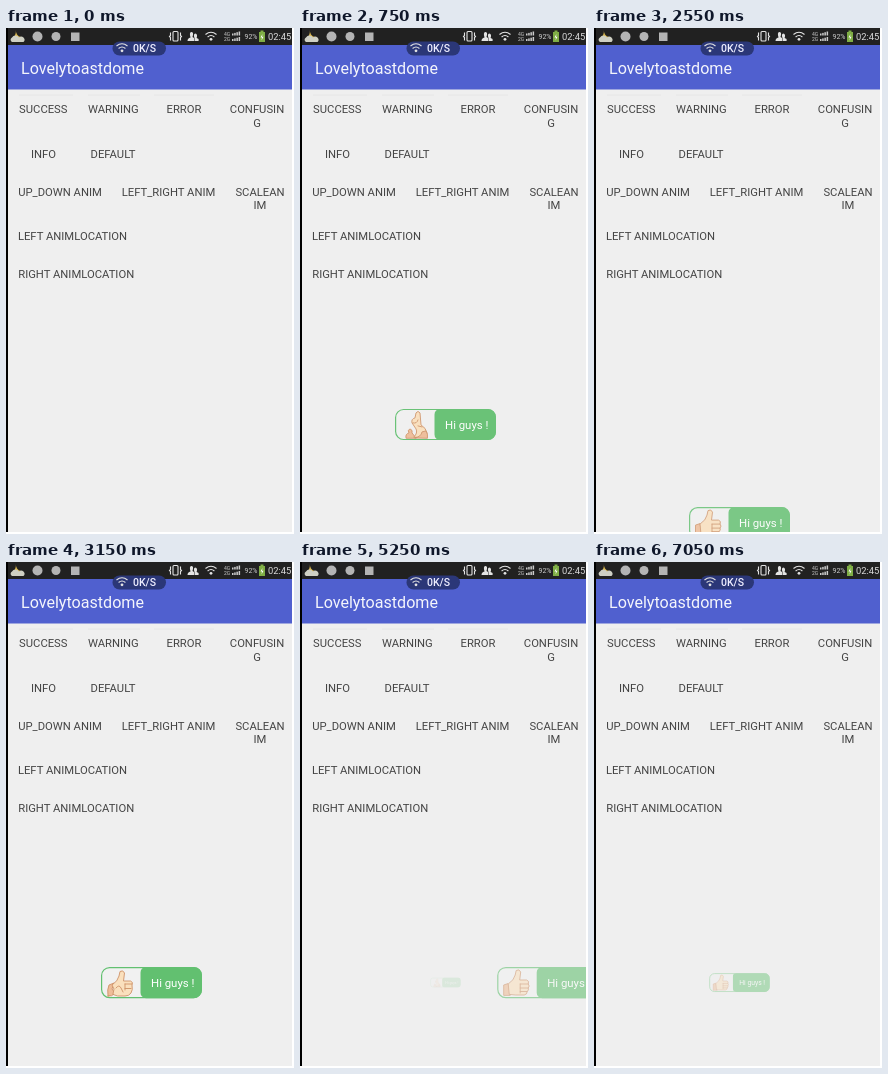
Write an HTML page that moves like this. It is 288x506 px and loops after 7.2 s.

```html
<!DOCTYPE html>
<html lang="en">
<head>
<meta charset="utf-8">
<title>Toast demo</title>
<style>
  html, body { margin: 0; width: 100%; height: 100%; overflow: hidden; background: #fff; }
  svg { display: block; width: 100vw; height: 100vh; }
  text { font-family: Roboto, sans-serif; font-size: 11.25px; }
  .hand { fill: #fae0bd; stroke: #cf9268; stroke-width: .9; stroke-linejoin: round; stroke-linecap: round; }
  .crease { fill: none; }
  .cuff { fill: #eebd98; }
  .line { fill: none; stroke: #e4e4e4; stroke-width: 1.1; }
</style>
</head>
<body>
<svg viewBox="0 0 288 506">
  <defs>
    <clipPath id="screen"><rect x="2" width="284" height="504"/></clipPath>
    <g id="wifi">
      <path class="line" d="M-5.5-2.5Q0-7 5.5-2.5M-3.4 0Q0-3 3.4 0"/>
      <circle cy="2.3" r="1.4" fill="#e4e4e4"/>
    </g>
    <g id="bars" fill="#ccc">
      <rect y="2" width="1.5" height="2"/><rect x="2.2" y="1.4" width="1.5" height="2.6"/>
      <rect x="4.4" y=".7" width="1.5" height="3.3"/><rect x="6.6" width="1.5" height="4"/>
    </g>
  </defs>

  <rect width="286" height="504"/>
  <rect x="2" width="284" height="17" fill="#212121"/>
  <rect x="2" y="17" width="284" height="487" fill="#efefef"/>
  <rect x="2" y="17" width="284" height="44.500" fill="#5060cf"/>
  <text x="15" y="45.500" fill="#f4f5fc" style="font-size:16.100px">Lovelytoastdome</text>

  <!-- Status bar -->
  <path d="M10 2a6 6 0 0 0 5 7l-3 3-6-1q4-3 4-9z" fill="#d8b64e"/>
  <path d="M6 14a2.500 2.500 0 0 1 0-4.500 4 4 0 0 1 7 0 2.500 2.500 0 0 1 4.500 4.500z" fill="#cfd0c4"/>
  <circle cx="31.500" cy="8.500" r="5" fill="#b4b4b4"/>
  <circle cx="50" cy="8.500" r="4.500" fill="#b4b4b4"/>
  <rect x="65" y="4.500" width="8.500" height="8.500" fill="#b4b4b4"/>
  <rect class="line" x="167" y="3.500" width="5" height="9.500" rx="1"/>
  <path class="line" d="M164.500 4.500v3l-1 1 1 1v3M174.500 4.500v3l1 1-1 1v3"/>
  <path d="M181.500 13q0-3 3-3.500q-1.500-5 .7-5.500q3 0 1.300 5l1.500 1v3zM188.500 13v-3q-1.500-4 .8-4.500q2.700 .5 1.300 4.500l2 1v2z" fill="#e4e4e4"/>
  <use href="#wifi" x="205" y="9"/>
  <g fill="#ccc">
    <text x="218" y="7.500" style="font-size:5px">4G</text>
    <text x="218" y="13" style="font-size:5px">2G</text>
    <text x="238.500" y="11" style="font-size:7px">92%</text>
  </g>
  <use href="#bars" x="226" y="3.500"/>
  <use href="#bars" x="226" y="9"/>
  <path d="M253 4h1.500v-1.500h3v1.500h1.500v10h-6z" fill="#7fae45"/>
  <path d="M256.500 6l-2 3.500h1.500l-.5 3 2-3.700h-1.500z" fill="#fff"/>
  <text x="262" y="12" fill="#dcdcdc" style="font-size:9.400px">02:45</text>

  <rect x="106.500" y="13.500" width="53.500" height="14" rx="7" fill="#2b3778"/>
  <use href="#wifi" x="116" y="20.500"/>
  <text x="127" y="24" fill="#eef" style="font-size:10.500px;font-weight:500">0K/S</text>

  <path d="M13 67h54M82 67h52M148 67h60" stroke="#e6e6e6"/>
  <g id="labels" fill="#444" text-anchor="middle"></g>
  <g id="toasts" clip-path="url(#screen)"></g>
</svg>

<script>
const LOOP = 7200, STEP = 150, MOVE = 800;
const CENTER_X = 145.5, CENTER_Y = 420.5;

const LABELS = [
  [37.3, 85, 'SUCCESS'], [107.3, 85, 'WARNING'], [178, 85, 'ERROR'],
  [251, 85, 'CONFUSIN'], [251, 98.5, 'G'],
  [37.5, 129.5, 'INFO'], [107, 129.5, 'DEFAULT'],
  [54, 168, 'UP_DOWN ANIM'], [162.5, 168, 'LEFT_RIGHT ANIM'],
  [254, 168, 'SCALEAN'], [254, 181, 'IM'],
  [66.5, 212, 'LEFT ANIMLOCATION'], [70.2, 250, 'RIGHT ANIMLOCATION']
];
document.getElementById('labels').innerHTML =
  LABELS.map(([x, y, s]) => `<text x="${x}" y="${y}">${s}</text>`).join('');

const TOASTS = [
  { enter: 62, leave: 2350, dx: 0, dy: 506 },
  { enter: 2350, leave: 4925, dx: 288, dy: 0 },
  { enter: 4955, leave: 6700, scale: true }
];

// Hand poses: raised finger, closing fist, thumb up
const POSES = [
  `<path class="cuff" d="M106 434q-1-4 3-5q-2-3 1-4q3 1 2 4l4 5z"/>
   <path d="M114 433q4-4 2-8l-4-6q-1-4 3-5l1-5q2-3 4 0l1 12q5 3 6 8v4z"/>
   <path class="cuff" d="M115 434q6-1 7-6l4-1q2 3 1.500 7z"/>
   <path class="crease" d="M113 419q4 1 5-3M118 422l4 1"/>`,
  `<path class="cuff" d="M102 434q-1-7 1-11l5-2-2 6 3 4q-3 4-7 3z"/>
   <path d="M107 432l1-5-2-4q6-4 7-9l1-4.500q3-2 4.500 1.500l-1 8h7q3 1 1.500 4q1 5-1 8q-2 3-6 3h-7z"/>
   <path class="crease" d="M110 426q3-4 5 0l2 4M119 422h7M119 426.500h6M119 422v6"/>`,
  `<path class="cuff" d="M101.500 433v-10l4.500-1.500 2 11.500z"/>
   <path d="M107 432l-1-10q6-4 7-9l1-4.500q3-2 4.500 1.500l-1 8h7q3 1 1.500 4q2 2 0 4q1 2-1 3.500q0 3-3 3.500h-8z"/>
   <path class="crease" d="M118 422h8M118 426h8M118 429.500h7M118 422v9"/>`
];

const toastMarkup = `
  <rect x="95.600" y="405.600" width="99.800" height="30" rx="8" fill="#f1f1f1" stroke="#62c070" stroke-width="1.200"/>
  <path d="M140 405h48a8 8 0 0 1 8 8v15.200a8 8 0 0 1-8 8h-48a5.500 5.500 0 0 1-5.500-5.500v-20.200a5.500 5.500 0 0 1 5.500-5.500z" fill="#62c070"/>
  <text x="145" y="425" fill="#fff" style="font-size:11.400px">Hi guys !</text>
  ${POSES.map(p => `<g class="hand">${p}</g>`).join('')}`;

const layer = document.getElementById('toasts');
for (const toast of TOASTS) {
  toast.node = document.createElementNS('http://www.w3.org/2000/svg', 'g');
  toast.node.innerHTML = toastMarkup;
  toast.hands = toast.node.querySelectorAll('.hand');
  layer.append(toast.node);
}

function ease(ms) {
  const t = Math.min(1, Math.max(0, ms / MOVE));
  return (1 - Math.cos(Math.PI * t)) / 2;
}

function placeToast(toast, time) {
  const shown = ease(time - toast.enter);
  const gone = ease(time - toast.leave);
  const presence = shown * (1 - gone);
  if (toast.scale) {
    toast.node.setAttribute('transform',
      `translate(${CENTER_X} ${CENTER_Y}) scale(${presence}) translate(${-CENTER_X} ${-CENTER_Y})`);
  } else {
    const shift = shown - 1 + gone;
    toast.node.setAttribute('transform', `translate(${toast.dx * shift} ${toast.dy * shift})`);
  }
  toast.node.setAttribute('opacity', presence ** (toast.scale ? 1.6 : 1.25));
  toast.node.style.display = presence > 0 ? '' : 'none';

  const age = time - toast.enter;
  const pose = age < 800 ? 0 : age < 1080 ? 1 : 2;
  toast.hands.forEach((hand, i) => { hand.style.display = i === pose ? '' : 'none'; });
}

const start = performance.now();
function draw() {
  const elapsed = Math.max(0, performance.now() - start) % LOOP;
  const time = Math.floor(elapsed / STEP) * STEP;
  TOASTS.forEach(toast => placeToast(toast, time));
  requestAnimationFrame(draw);
}
draw();
</script>
</body>
</html>
```
